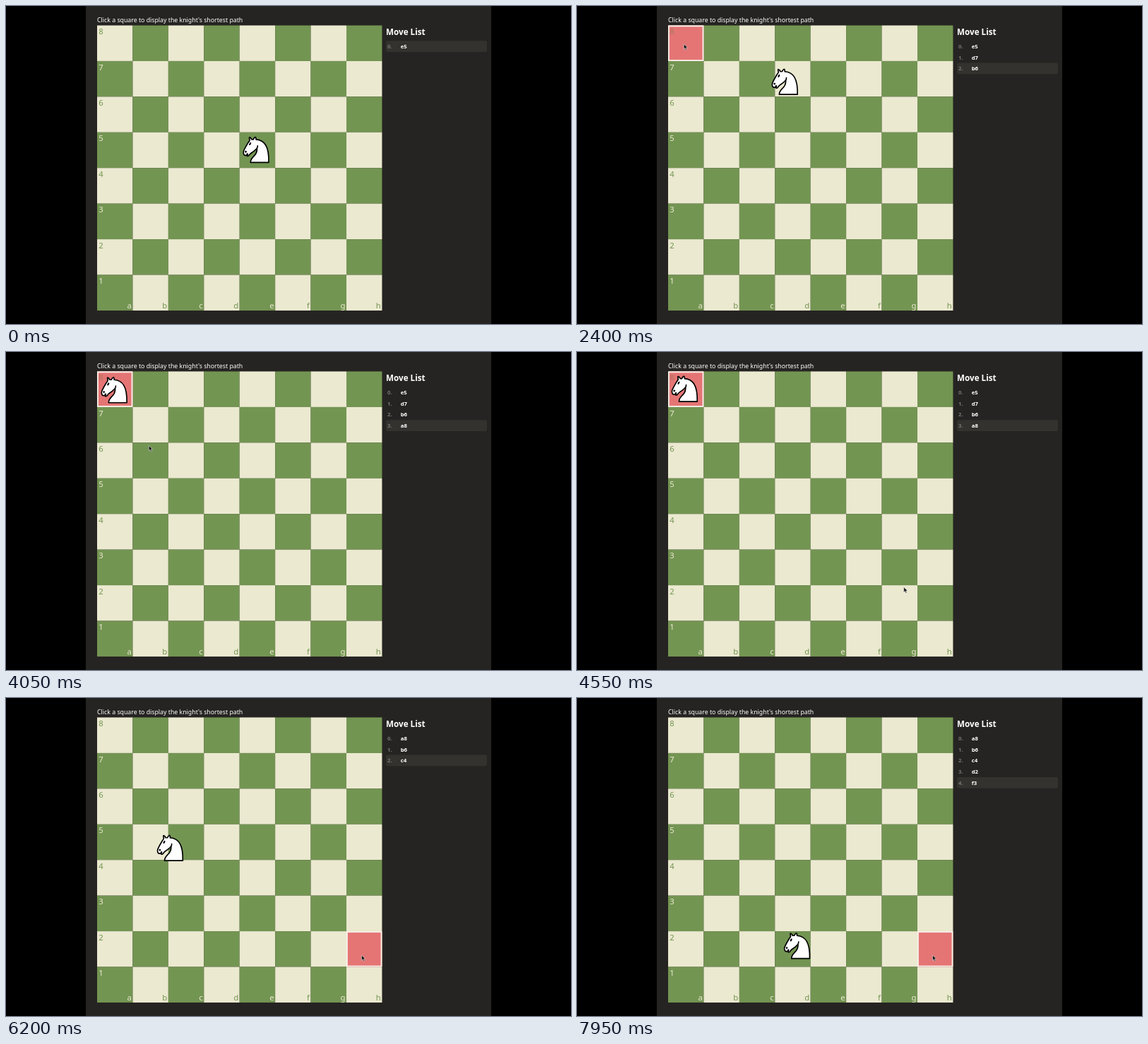
An HTML page that plays this animation: 800x450 px, repeating every 8 s.

```html
<!DOCTYPE html>
<html lang="en">
<head>
<meta charset="utf-8">
<title>Knight's shortest path</title>
<style>
  html, body { margin: 0; width: 100%; height: 100%; overflow: hidden; background: #000; }
  svg { display: block; width: 800px; height: 450px; font-family: "Noto Sans", "Open Sans", sans-serif; }
  .hint { font-size: 8.75px; font-weight: 500; fill: #fff; }
  .title { font-size: 11.7px; font-weight: 700; fill: #fff; }
  .label { font-size: 11.3px; }
  .row { font-size: 7.8px; font-weight: 700; fill: #fff; }
  .row .index { font-weight: 600; fill: #777572; }
</style>
</head>
<body>
<svg viewBox="0 0 800 450">
  <rect width="800" height="450" fill="#000"/>
  <rect x="113" width="574" height="450" fill="#262422"/>
  <text class="hint" x="129" y="22.5">Click a square to display the knight's shortest path</text>
  <g id="board"></g>
  <g id="target">
    <rect width="50.43" height="50.43" fill="#e57575"/>
    <rect x=".9" y=".9" width="48.6" height="48.6" fill="none" stroke="#f8f5ee" stroke-width="1.8"/>
  </g>
  <g id="labels"></g>
  <text class="title" x="538" y="41">Move List</text>
  <rect id="current" x="538" width="143" height="15.7" rx="2" fill="#34322f"/>
  <g id="rows"></g>
  <g id="knight" stroke="#000" stroke-width="1.5" stroke-linecap="round" stroke-linejoin="round">
    <g transform="translate(-1.3 -1.1) scale(1.12)">
      <path fill="#fff" d="M22 10C32.5 11 38.5 18 38 39H15C15 30 25 32.5 23 18"/>
      <path fill="#fff" d="M24 18C24.4 20.9 18.5 25.4 16 27C13 29 13.2 31.3 11 31C10 30 12.4 28 11 28C10 28 11.2 29.2 10 30C9 30 6 31 6 26C6 24 12 14 12 14S13.9 12.1 14 10.5C13.3 9.5 13.5 8.5 13.5 7.5C14.5 6.5 16.5 10 16.5 10H18.5S19.3 8 21 7C22 7 22 10 22 10"/>
      <circle cx="9" cy="25.5" r=".5"/>
      <ellipse cx="14.5" cy="15.5" rx=".5" ry="1.5" transform="rotate(30 14.5 15.5)" stroke-width="1"/>
    </g>
  </g>
  <path id="cursor" d="M0 0V7.2L1.7 5.7L2.9 8.4L4.2 7.8L3 5.2H5.2Z" fill="#111" stroke="#ddd" stroke-width=".6"/>
</svg>
<script>
const LOOP = 8000, STEP = 50, MOVE = 900, BEAT = 988;
const CELL = 50.43, LEFT = 129, TOP = 27.5, ROW = 15.7;
const LIGHT = '#ebe9d0', DARK = '#739552';

// Each trip lists its squares; one move begins every beat after the click.
const trips = [
  { click: 1323, path: ['e5', 'd7', 'b6', 'a8'] },
  { click: 4906, path: ['a8', 'b6', 'c4', 'd2', 'f3', 'h2'] },
];
const cursorKeys = [
  [750, 108, 66], [1150, 151.3, 53.8], [3800, 151.3, 53.8],
  [4050, 202.3, 132.5], [4700, 503.5, 364],
];

const $ = id => document.getElementById(id);
function add(parent, tag, attrs, text = '') {
  const el = document.createElementNS('http://www.w3.org/2000/svg', tag);
  for (const name in attrs) el.setAttribute(name, attrs[name]);
  el.textContent = text;
  return parent.appendChild(el);
}
const place = (el, [x, y]) => el.setAttribute('transform', `translate(${x} ${y})`);
const show = (el, on) => el.setAttribute('visibility', on ? 'visible' : 'hidden');
const mix = (a, b, p) => a.map((v, i) => v + (b[i] - v) * p);
const corner = square => [
  LEFT + (square.charCodeAt(0) - 97) * CELL,
  TOP + (8 - square[1]) * CELL,
];

// cubic-bezier(.25, .1, .25, 1)
function ease(x) {
  if (x <= 0) return 0;
  if (x >= 1) return 1;
  let lo = 0, hi = 1;
  for (let i = 0; i < 24; i++) {
    const s = (lo + hi) / 2;
    if (.75 * s * (1 - s) + s ** 3 < x) lo = s; else hi = s;
  }
  return .3 * lo * (1 - lo) ** 2 + 3 * lo * lo * (1 - lo) + lo ** 3;
}

for (let r = 0; r < 8; r++) {
  for (let c = 0; c < 8; c++) {
    add($('board'), 'rect', {
      x: LEFT + c * CELL, y: TOP + r * CELL, width: CELL, height: CELL,
      fill: (r + c) % 2 ? DARK : LIGHT,
    });
  }
}
const rankLabels = [];
for (let i = 0; i < 8; i++) {
  rankLabels.push(add($('labels'), 'text', {
    class: 'label', x: 131.2, y: 40.2 + i * CELL, fill: i % 2 ? LIGHT : DARK,
  }, 8 - i));
  add($('labels'), 'text', {
    class: 'label', x: LEFT + (i + 1) * CELL - 1.6, y: 428,
    'text-anchor': 'end', fill: i % 2 ? DARK : LIGHT,
  }, 'abcdefgh'[i]);
}
const rows = [0, 1, 2, 3, 4].map(i => {
  const group = add($('rows'), 'g', { class: 'row' });
  const y = 59.8 + i * ROW;
  add(group, 'text', { class: 'index', x: 540, y }, i + '.');
  return { group, name: add(group, 'text', { x: 558.7, y }) };
});

function cursorAt(t) {
  const next = cursorKeys.findIndex(key => key[0] > t);
  if (next < 0) return cursorKeys.at(-1).slice(1);
  const [from, to] = [cursorKeys[next - 1], cursorKeys[next]];
  const p = (t - from[0]) / (to[0] - from[0]);
  return mix(from.slice(1), to.slice(1), p * p * (3 - 2 * p));
}

function draw(t) {
  const { click, path } = trips[t < trips[1].click ? 0 : 1];
  const started = t >= click;
  const index = started ? Math.min(path.length - 1, 1 + Math.floor((t - click) / BEAT)) : 0;

  const progress = ease((t - click - (index - 1) * BEAT) / MOVE);
  place($('knight'), index
    ? mix(corner(path[index - 1]), corner(path[index]), progress)
    : corner(path[0]));

  const goal = path.at(-1);
  show($('target'), started);
  place($('target'), corner(goal));
  rankLabels[0].setAttribute('fill', started && goal === 'a8' ? '#a9765a' : DARK);

  $('current').setAttribute('y', 49.2 + index * ROW);
  rows.forEach(({ group, name }, i) => {
    show(group, i <= index);
    name.textContent = path[i] || '';
  });

  const visible = t >= cursorKeys[0][0];
  show($('cursor'), visible);
  if (visible) place($('cursor'), cursorAt(t));
}

function tick() {
  const t = performance.now() % LOOP;
  draw(Math.floor(t / STEP) * STEP);
  requestAnimationFrame(tick);
}
tick();
</script>
</body>
</html>
```
